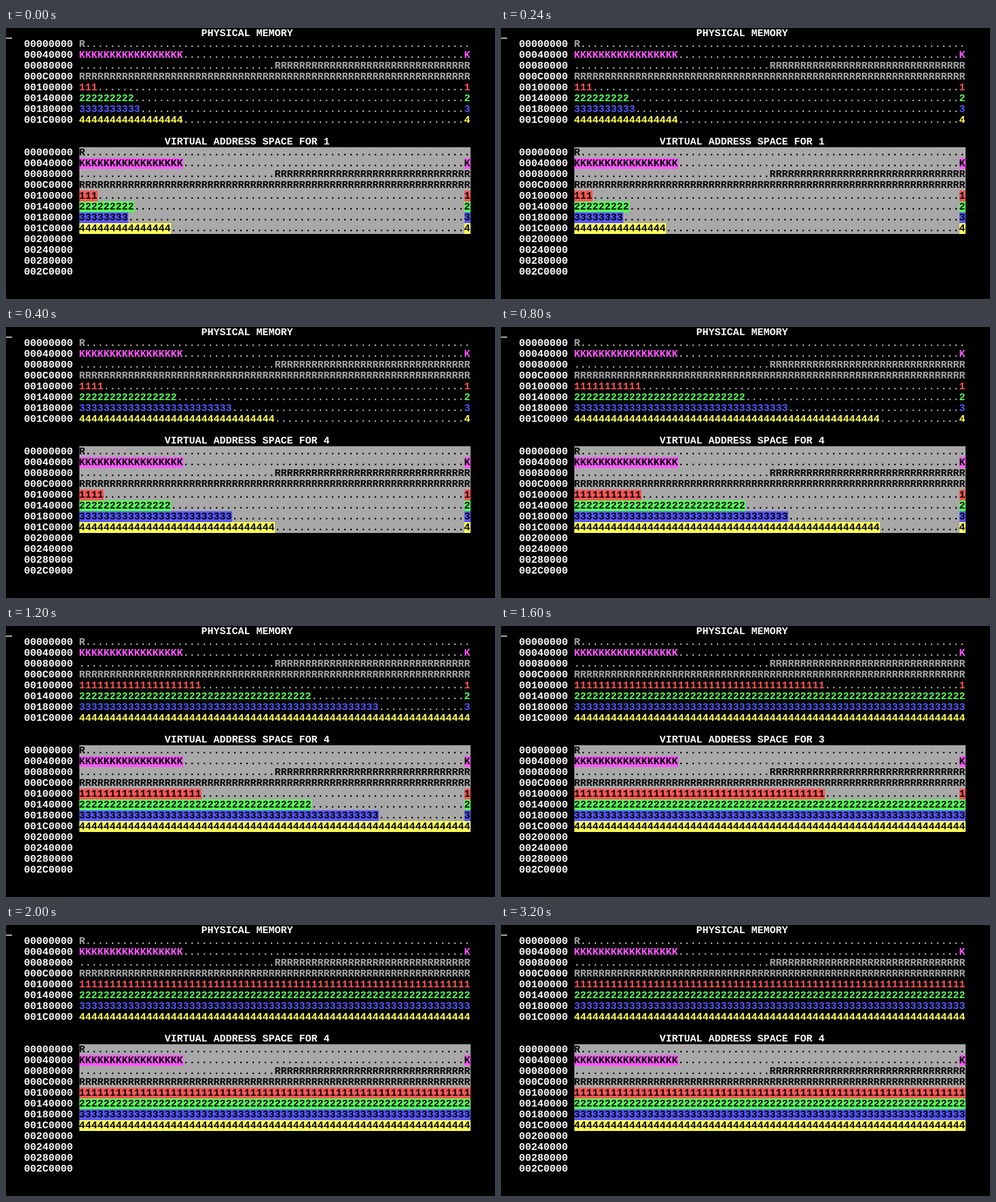
An HTML page with a canvas that plays this animation: 720x400 px, repeating every 4000 ms.

```html
<!DOCTYPE html>
<html lang="en">
<head>
<meta charset="utf-8">
<title>Memory map</title>
<style>
  html, body { margin: 0; width: 100%; height: 100%; overflow: hidden; background: #000; }
  canvas { display: block; }
</style>
</head>
<body>
<canvas id="screen" width="720" height="400"></canvas>
<script>
const CW = 9, CH = 16, COLS = 64, LEFT = 12, LOOP = 4000, STEP = 400;
const GRAY = '#a8a8a8', WHITE = '#fff', BLACK = '#000';
const COLORS = {
  '.': GRAY, R: GRAY, K: '#ff57ff',
  1: '#ff5757', 2: '#57ff57', 3: '#5757ff', 4: '#ffff57'
};

// Pages held by processes 1-4; virt defaults to the physical counts.
const STEPS = [
  { active: 1, phys: [3, 9, 10, 17], virt: [3, 9, 8, 15] },
  { active: 4, phys: [4, 16, 25, 32], virt: [4, 15, 25, 32] },
  { active: 4, phys: [11, 28, 35, 50] },
  { active: 4, phys: [20, 38, 49, 64] },
  { active: 3, phys: [41, 64, 64, 64] },
  { active: 4, phys: [64, 64, 64, 64] }
];

const ctx = document.getElementById('screen').getContext('2d');

function put(ch, col, row, color, back) {
  if (back) {
    ctx.fillStyle = back;
    ctx.fillRect(col * CW, row * CH, CW, CH);
  }
  ctx.fillStyle = color;
  ctx.fillText(ch, col * CW + 4, row * CH + 12);
}

function print(text, col, row) {
  [...text].forEach((ch, i) => put(ch, col + i, row, WHITE));
}

function printAddresses(row, count) {
  for (let i = 0; i < count; i++) {
    const hex = (i * 0x40000).toString(16).toUpperCase();
    print(hex.padStart(8, '0'), 3, row + i);
  }
}

const heap = (ch, n) => ch.repeat(n).padEnd(COLS - 1, '.') + ch;

function drawMap(row, counts, reverse) {
  const lines = [
    'R'.padEnd(COLS, '.'),
    heap('K', 17),
    'R'.repeat(32).padStart(COLS, '.'),
    'R'.repeat(COLS),
    ...counts.map((n, i) => heap(String(i + 1), Math.min(n, COLS - 1)))
  ];
  lines.forEach((line, y) => [...line].forEach((ch, x) => {
    const color = COLORS[ch];
    put(ch, LEFT + x, row + y, reverse ? BLACK : color, reverse && color);
  }));
}

function draw({ active, phys, virt = phys }) {
  ctx.fillStyle = BLACK;
  ctx.fillRect(0, 0, 720, 400);
  ctx.font = 'bold 15px "Liberation Mono", "DejaVu Sans Mono", monospace';
  ctx.textAlign = 'center';
  ctx.textBaseline = 'alphabetic';

  print('PHYSICAL MEMORY', 32, 0);
  printAddresses(1, 8);
  drawMap(1, phys, false);

  print('VIRTUAL ADDRESS SPACE FOR ' + active, 26, 10);
  printAddresses(11, 12);
  drawMap(11, virt, true);

  // Text cursor
  ctx.fillStyle = GRAY;
  ctx.fillRect(0, 14, CW, 2);
}

let shown = -1;
const start = performance.now();

function tick() {
  const t = (performance.now() - start) % LOOP;
  const step = Math.min(STEPS.length - 1, Math.floor(t / STEP));
  if (step !== shown) {
    draw(STEPS[step]);
    shown = step;
  }
  requestAnimationFrame(tick);
}
tick();
</script>
</body>
</html>
```
